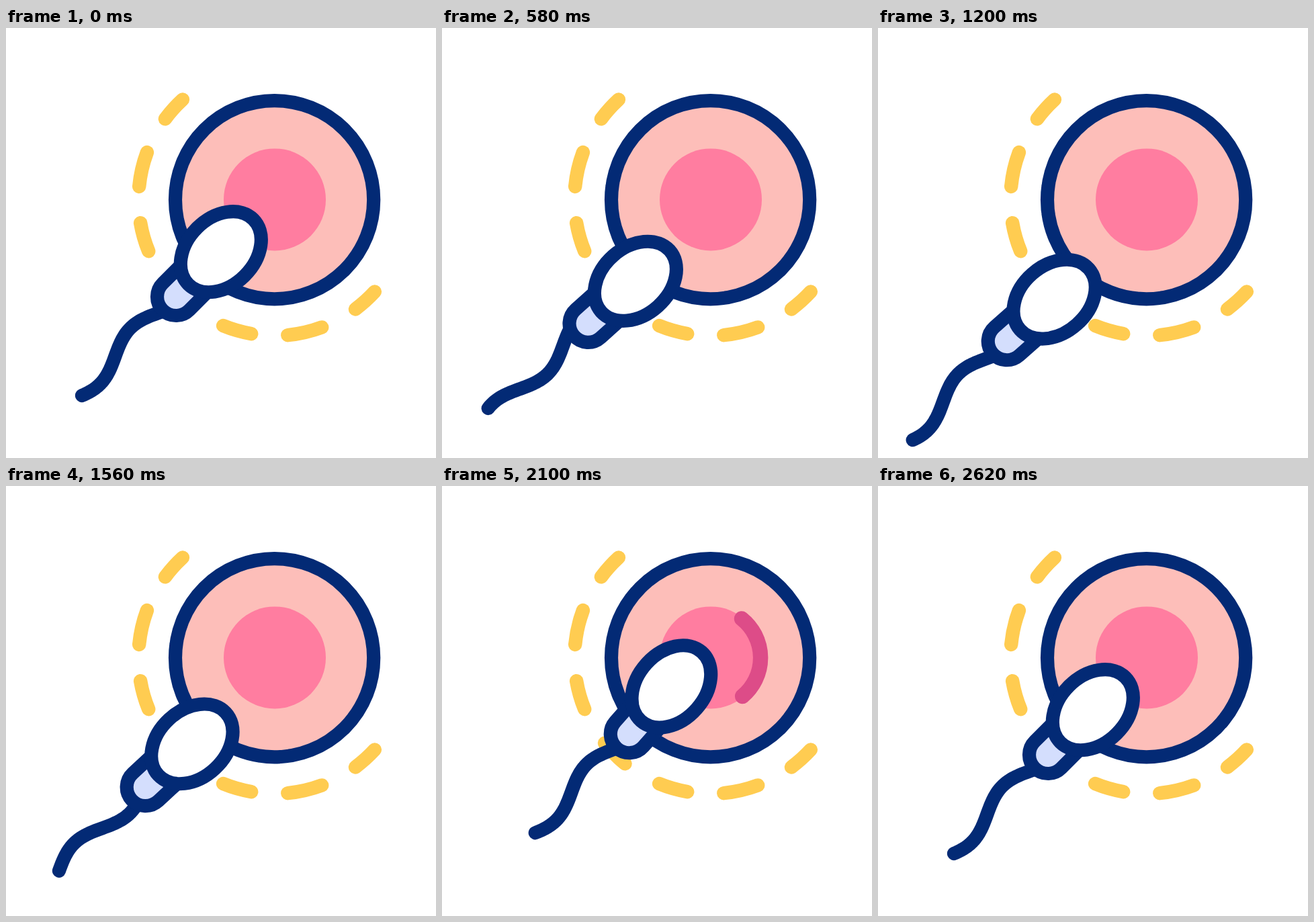
An HTML page for the animation above (3600 ms loop, 640x640 px).

```html
<!DOCTYPE html>
<html lang="en">
<head>
<meta charset="utf-8">
<title>Fertilization</title>
<style>
  html, body { margin: 0; width: 100%; height: 100%; overflow: hidden; background: #fff; }
  svg { display: block; width: 100vw; height: 100vh; }
  .line { stroke: #032a75; stroke-width: 20.2; stroke-linecap: round; stroke-linejoin: round; }
</style>
</head>
<body>
<svg viewBox="0 0 640 640">
  <path id="dashes" fill="none" stroke="#ffcc51" stroke-width="20.5" stroke-linecap="round"/>
  <circle class="line" cx="399.6" cy="255.7" r="147.6" fill="#fdbeb9"/>
  <circle cx="400" cy="255.4" r="76" fill="#ff7da0"/>
  <path id="sweep" fill="none" stroke="#dd4c88" stroke-width="22.5" stroke-linecap="round"/>
  <path id="tail" class="line" fill="none"/>
  <g id="body">
    <g transform="rotate(-45)">
      <path class="line" fill="#d4defd" d="M60-28H0A28 28 0 0 0 0 28H60Z"/>
      <ellipse class="line" cx="94.5" cy="0" rx="68.4" ry="50.2" fill="#fff"/>
    </g>
  </g>
</svg>
<script>
const LOOP = 3600, START = 100, END = 2620, BEAT = 200;
const CX = 399.6, CY = 255.7;
const el = id => document.getElementById(id);
const [dashes, sweep, tail, body] = ['dashes', 'sweep', 'tail', 'body'].map(el);

const ramp = (t, from, to) => Math.min(1, Math.max(0, (t - from) / (to - from)));
const smooth = u => u * u * (3 - 2 * u);
const ease = (t, from, to) => smooth(ramp(t, from, to));
const turns = n => n * 2 * Math.PI;

function arc(r, from, to) {
  const at = deg => {
    const a = turns(deg / 360);
    return (CX + r * Math.cos(a)).toFixed(2) + ' ' + (CY + r * Math.sin(a)).toFixed(2);
  };
  const big = Math.abs(to - from) > 180 ? 1 : 0;
  return `M${at(from)}A${r} ${r} 0 ${big} ${to > from ? 1 : 0} ${at(to)}`;
}

// Draw back slowly, speed up towards the egg, then settle
const retreat = t => 64 * ease(t, START, 960)
  - 98 * ramp(t, 1150, 2130) ** 2
  + 34 * ease(t, 2130, END);

// The wave runs out from the neck along the diagonal; swing shifts it to and fro
function drawTail(x, y, swing, sway) {
  const begin = 18, length = 203 - 27 * swing * swing, steps = 48;
  const phase = 0.445 + 0.75 * swing, rest = -1.5 - 0.5 * sway;
  const pts = [];
  for (let i = 0; i <= steps; i++) {
    const u = begin + (length - begin) * i / steps;
    const w = rest - 13.5 * Math.cos(turns(u / 182 - phase));
    pts.push((x + (w - u) * Math.SQRT1_2).toFixed(2) + ' ' + (y + (w + u) * Math.SQRT1_2).toFixed(2));
  }
  tail.setAttribute('d', 'M' + pts.join('L'));
}

function drawSweep(t) {
  const angle = begin => 137 - 360 * ramp(t, begin, begin + 598);
  const lead = angle(1788), trail = angle(1957);
  sweep.setAttribute('d', trail - lead > 0.01 ? arc(74.5, trail, lead) : '');
}

function draw(time) {
  const t = Math.min(END, Math.max(START, time % LOOP));
  const settle = 1 - ease(t, END - 120, END);
  const swing = settle * ramp(t, START, START + 100) * Math.sin(turns(t / BEAT));
  const sway = 3.7 * settle * ease(t, START, START + 600) * Math.cos(turns((t + 8) / BEAT));
  const back = retreat(t), drift = 0.7 * sway;
  const x = 253 - back + drift, y = 400 + back + drift;
  body.setAttribute('transform', `translate(${x} ${y}) rotate(${sway})`);
  drawTail(x, y, swing, sway);
  drawSweep(t);
}

// Dashes ring the egg, mirrored about the lower-left diagonal
const halfSpan = [6.1, 6.2, 7.4, 5.5];
let ring = '';
for (let k = -3; k <= 3; k++) {
  const mid = 135 + 29 * k, half = halfSpan[Math.abs(k)];
  ring += arc(202.4, mid - half, mid + half);
}
dashes.setAttribute('d', ring);

const origin = performance.now();
function tick() {
  draw(performance.now() - origin);
  requestAnimationFrame(tick);
}
tick();
</script>
</body>
</html>
```
